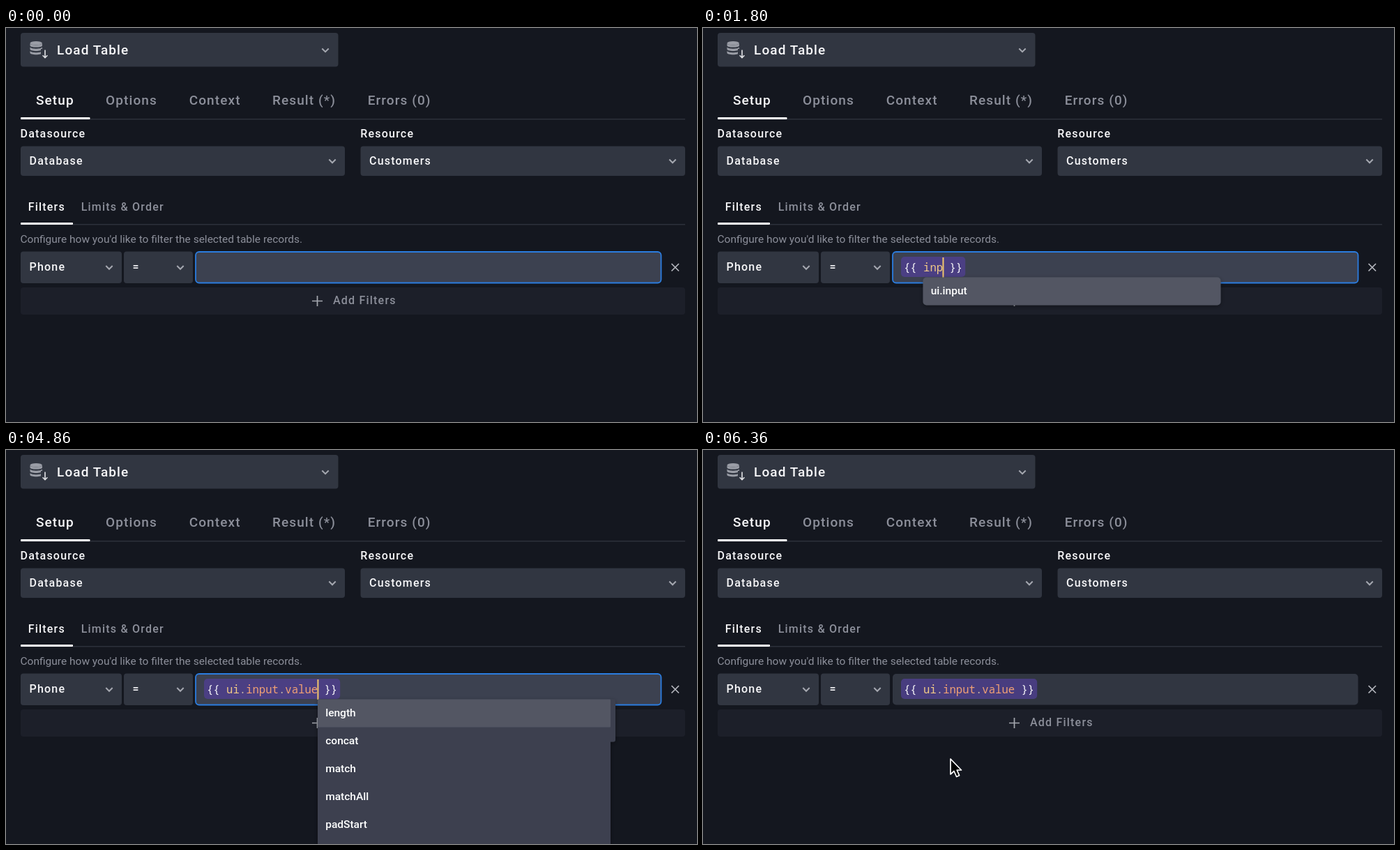
Animation, 991 px wide and 565 px high, one loop 6390 ms. Source, as an HTML page:

```html
<!DOCTYPE html>
<html lang="en">
<head>
<meta charset="utf-8">
<title>Table filter</title>
<style>
  html, body { margin: 0; width: 100%; height: 100%; overflow: hidden; background: #14171f; }
  svg { display: block; width: 991px; height: 565px; }
  text { font-family: Roboto, sans-serif; font-weight: 500; white-space: pre; }
  #code { font: 400 15.6px "Noto Sans Mono", "DejaVu Sans Mono", monospace; }
</style>
</head>
<body>
<svg id="stage" viewBox="0 0 991 565">
  <defs>
    <filter id="shadow" x="-10%" y="-30%" width="120%" height="180%">
      <feDropShadow dx="0" dy="2" stdDeviation="3" flood-color="#000" flood-opacity=".35"/>
    </filter>
  </defs>
  <g id="form"></g>
  <g id="editor">
    <rect id="field" x="272" y="321" width="667.5" height="44.5" rx="5" fill="#3c4150"/>
    <rect id="focus" x="272" y="321" width="667.5" height="44.5" rx="5" fill="none" stroke="#2b7de0" stroke-width="1.8"/>
    <rect id="pill" x="284" y="328" height="29" rx="5" fill="#513f94" fill-opacity=".75"/>
    <text id="code" x="288" y="349"></text>
    <rect id="caret" y="329" width="2" height="29" fill="#f2c76b"/>
  </g>
  <g id="popup" filter="url(#shadow)"></g>
  <circle id="ring" cx="354.5" cy="444.5" fill="none" stroke="#989a9e" stroke-width="4"/>
  <path id="pointer" d="M0 0V22L5 17.5L8.6 25.5L12.6 23.7L9.2 16H15.5Z" fill="#000" stroke="#fff" stroke-width="1.7" stroke-linejoin="round"/>
</svg>
<script>
const LOOP = 6390, CHAR = 9.36, BLINK = 530, BLUR = 5840, CLOSE = 5945, PRESS = 5760;
const WHITE = '#f7f7f9', GRAY = '#8c8f9a', PANEL = '#313641';
const $ = id => document.getElementById(id);
const clamp = v => Math.max(0, Math.min(1, v));
const easeOut = v => 1 - (1 - v) ** 2;

const box = (x, y, w, h, fill, r = 4) =>
  `<rect x="${x}" y="${y}" width="${w}" height="${h}" rx="${r}" fill="${fill}"/>`;
const label = (x, y, text, fill = WHITE, size = 16, gap = 1.2, weight = 500) =>
  `<text x="${x}" y="${y}" fill="${fill}" font-size="${size}" letter-spacing="${gap}" style="font-weight:${weight}">${text}</text>`;
const stroke = (d, color, width = 2) =>
  `<path d="${d}" fill="none" stroke="${color}" stroke-width="${width}"/>`;
const chevron = (x, y) => stroke(`M${x - 4.7} ${y - 2.5}l4.7 4.7l4.7 -4.7`, '#a5a8b0');
const select = (x, y, w, h, text) =>
  box(x, y, w, h, PANEL) + label(x + 12.5, y + 26 + (h > 44 ? 1.5 : 0), text) + chevron(x + w - 18, y + h / 2 + .3);
const tabs = (items, y, size, gap) =>
  items.map(([x, text], i) => label(x, y, text, i ? GRAY : WHITE, size, gap)).join('');

function databaseIcon() {
  const disc = y => `<path d="M34.5 ${y}v2.6c0 3.6 17.5 3.6 17.5 0v-2.6c-2 3-15.5 3-17.5 0z" fill="#9a9da6"/>`;
  return '<ellipse cx="43.2" cy="21.8" rx="8.7" ry="2.8" fill="#9a9da6"/>' + [22.3, 27.6, 32.9].map(disc).join('') +
    box(50, 30, 12, 15, PANEL, 0) + stroke('M56 31.5V42.5M52.6 39.3L56 42.7L59.4 39.3', '#e4e5e8', 1.6);
}

$('form').innerHTML =
  box(21, 7, 455.5, 48.5, PANEL) + databaseIcon() + label(73, 38, 'Load Table', WHITE, 19, 1.1) + chevron(458, 32) +
  box(21, 130, 953, 1.5, '#2d313b', 0) + box(21, 128, 99.5, 3, '#fff', 1) +
  tabs([[43, 'Setup'], [143, 'Options'], [262.7, 'Context'], [382, 'Result (*)'], [518.7, 'Errors (0)']], 110, 19, 1.1) +
  label(20.5, 157, 'Datasource') + label(508.3, 157, 'Resource') +
  select(21, 169.5, 465, 42.5, 'Database') + select(508.5, 169.5, 465.5, 42.5, 'Customers') +
  box(21, 281, 953, 1.5, '#2d313b', 0) + box(21, 279, 75, 3, '#fff', 1) +
  tabs([[31.7, 'Filters'], [107.7, 'Limits &amp; Order']], 262, 16, 1.2) +
  label(20.5, 308, "Configure how you'd like to filter the selected table records.", GRAY, 15.5, 0, 400) +
  select(21, 320.5, 145, 45.5, 'Phone') + select(169, 320.5, 99, 45.5, '=') +
  stroke('M954.5 338L965 348.5M965 338L954.5 348.5', '#b4b6bd', 1.7) +
  box(21, 372, 953, 39, '#1c1f29') +
  stroke('M439 391.5H454M446.5 384V399', '#a5a8b0', 1.7) + label(469, 396, 'Add Filters', GRAY);

const VAR = '#f0c987', PROP = '#f0a075', DOT = '#c9b9a8';
const ui = ['ui', VAR], dot = ['.', DOT], input = ['input', PROP], value = ['value', PROP];
const open = ['{{ ', WHITE], close = [' }}', WHITE];
const matches = { x: 316, thumb: 146, items: ['ui.input', 'ui.smartTable.selectedRowIndex', 'actions.loadUsers.loading',
  'actions.updateUser.loading', 'actions.loadArticles.loading', 'actions.updateArticle.loading'] };
const methods = { x: 447, thumb: 61, items: ['length', 'concat', 'match', 'matchAll', 'padStart', 'padEnd'] };

// Each step: start time, tokens, caret column, suggestions
const steps = [
  [0, [], 0],
  [210, [['{}', WHITE]], 1],
  [390, [open, close], 3],
  [690, [open, ['i', VAR], close], 4, matches],
  [1050, [open, ['in', '#f09a5c'], close], 5, matches],
  [1500, [open, ['inp', VAR], close], 6, { x: 315.5, items: ['ui.input'] }],
  [2820, [open, ui, dot, input, close], 11, { x: 391, items: ['value'] }],
  [4440, [open, ui, dot, input, dot, value, close], 17, methods]
];

function popupMarkup({ x, thumb, items }) {
  const text = items.map((item, i) => label(x + 11.2, 382 + i * 39.9, item, '#fff', 15.5, 0)).join('');
  if (!thumb) return box(x, 357.5, 427, 40, '#525764', 5) + text;
  return box(x, 357.5, 420, 240, '#3c4150', 2) + box(x + 412, 357.5, 15, thumb, '#3c4150', 3) +
    box(x, 357.5, 420, 40, '#525764', 1) + text;
}

let shown = null;
function showStep(step) {
  if (step === shown) return;
  shown = step;
  const [, tokens, , list] = step;
  $('code').innerHTML = tokens.map(([text, fill]) => `<tspan fill="${fill}">${text}</tspan>`).join('');
  const length = tokens.reduce((sum, [text]) => sum + text.length, 0);
  $('pill').setAttribute('width', length * CHAR + 8);
  $('pill').style.display = length > 2 ? '' : 'none';
  $('popup').innerHTML = list ? popupMarkup(list) : '';
}

function mix(a, b, k) {
  return `rgb(${a.map((v, i) => v + (b[i] - v) * k).join()})`;
}

function draw(t) {
  const step = steps.filter(s => s[0] <= t).pop();
  showStep(step);

  const blur = clamp((t - BLUR) / 150);
  $('field').setAttribute('fill', mix([60, 65, 80], [49, 54, 65], easeOut(clamp(blur * 1.8))));
  $('focus').style.opacity = 1 - blur * blur;
  $('popup').style.display = t < CLOSE ? '' : 'none';

  const blinkOn = Math.floor((t - step[0]) / BLINK) % 2 === 0;
  $('caret').setAttribute('x', 287.3 + step[2] * CHAR);
  $('caret').style.display = step[2] && blinkOn && t < BLUR ? '' : 'none';

  const travel = easeOut(clamp((t - 5550) / 210));
  $('pointer').setAttribute('transform', `translate(${400 - 45 * travel} ${422 + 21 * travel})`);
  $('pointer').style.display = t >= 5550 ? '' : 'none';

  const grow = clamp((t - PRESS) / 480);
  $('ring').setAttribute('r', 20 + 31 * easeOut(grow) * .92);
  $('ring').style.opacity = t < PRESS ? 0 : .8 * clamp((1 - grow) / .75);
}

function tick(now) {
  draw(now % LOOP);
  requestAnimationFrame(tick);
}
draw(0);
requestAnimationFrame(tick);
</script>
</body>
</html>
```
